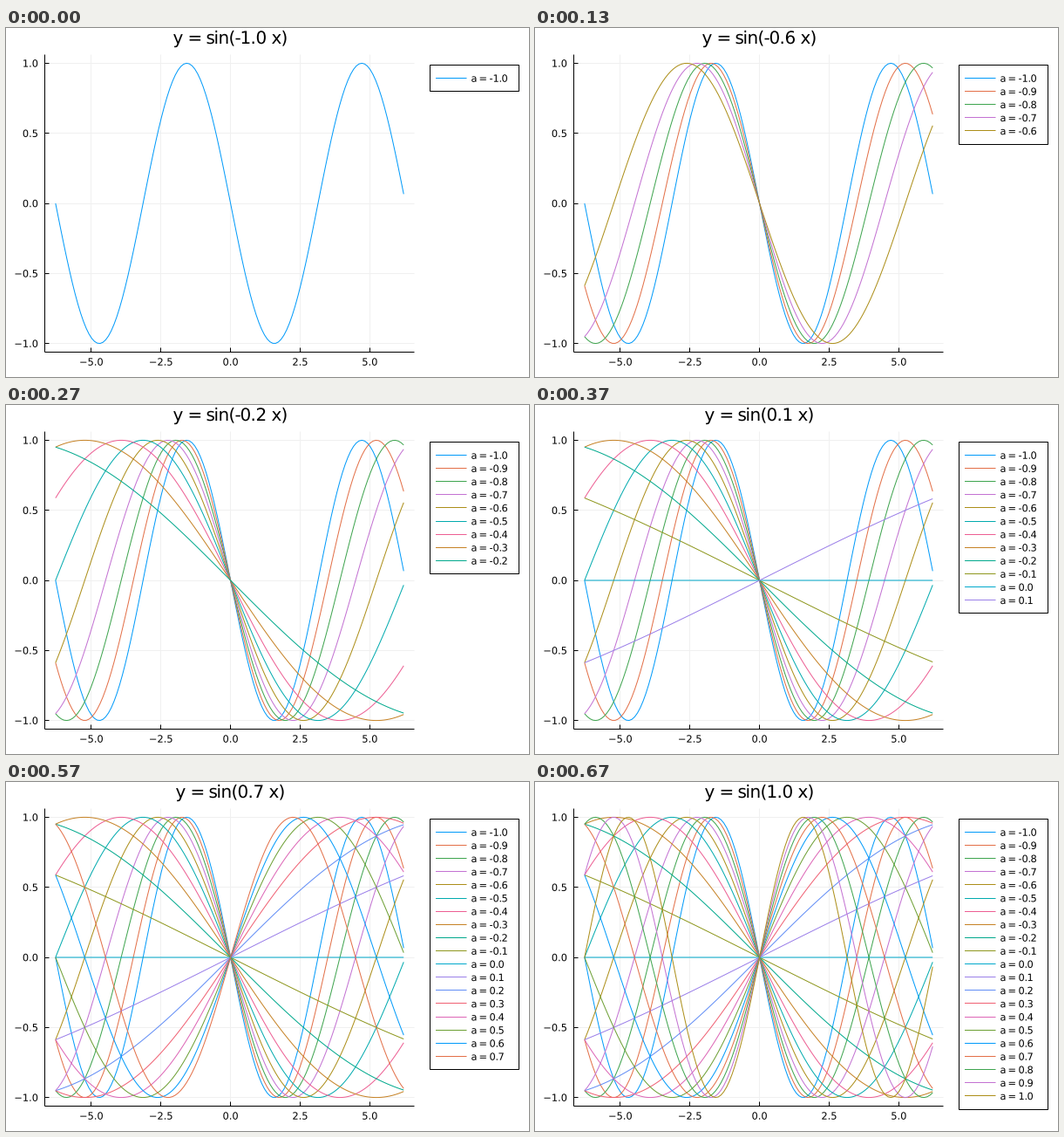
Write a matplotlib script that moves like this. It is 600 px wide and 400 px high and loops after 710 ms.

```python
import math
from functools import lru_cache

import matplotlib.pyplot as plt
import numpy as np
from matplotlib.animation import FuncAnimation
from matplotlib.patches import PathPatch, Rectangle
from matplotlib.path import Path
from matplotlib.textpath import TextPath
from matplotlib.transforms import Affine2D

plt.rcParams["font.family"] = "DejaVu Sans"
plt.rcParams["path.simplify"] = False

W, H, DPI = 600, 400, 100
PX = 72 / DPI                     # one pixel in points
LEFT, RIGHT, TOP, BOTTOM = 44.5, 468.5, 30.5, 371.5
SMALL, LARGE = 11.4, 20           # font sizes in pixels
CURVES = 21
LEGEND_TOP, ROW = 42.5, 15.12

COLORS = (
    "#009afa #e36f47 #3ea44e #c371d2 #ac8e18 #00aaae #ed5e93 #c68225 "
    "#00a98d #8e971e #00a9cc #9b7fe9 #618df6 #f06073 #dd65b6 #6c9f33"
).split()


def px(x):
    return 257.6 + 31.95 * x


def py(y):
    return 201 - 160.6 * y


def crisp(v):
    """Centre of the pixel that holds v."""
    return math.floor(v) + 0.5


fig = plt.figure(figsize=(W / DPI, H / DPI), dpi=DPI, facecolor="white")
ax = fig.add_axes([0, 0, 1, 1])
ax.set_xlim(0, W)
ax.set_ylim(H, 0)
ax.axis("off")


def line(xs, ys, color="black", z=2.0):
    return ax.plot(xs, ys, color=color, lw=PX, zorder=z, snap=False,
                   solid_capstyle="butt")[0]


def hline(y, x0, x1, color="black", z=2.0):
    return line([x0, x1], [crisp(y)] * 2, color, z)


def vline(x, y0, y1, color="black", z=2.0):
    return line([crisp(x)] * 2, [y0, y1], color, z)


@lru_cache(None)
def advance(char, size):
    """Pen advance of one glyph, measured between two bars."""
    def end(s):
        return TextPath((0, 0), s, size=size).vertices[:, 0].max()
    return end(f"|{char}|") - end("||")


def label(x, y, text, size=SMALL, align=0.0, pitch=None):
    """Text on baseline y; pitch is the size that sets whole-pixel steps."""
    pen, glyphs = 0, []
    for char in text:
        if char != " ":
            glyphs.append(TextPath((pen, 0), char, size=size))
        pen += math.floor(advance(char, pitch)) if pitch else advance(char, size)
    place = Affine2D().scale(1, -1).translate(x - align * pen, y)
    patch = PathPatch(Path.make_compound_path(*glyphs), fc="black", lw=0,
                      transform=place + ax.transData, zorder=6)
    return ax.add_patch(patch)


def number(v):
    return f"{v:.1f}".replace("-", "\u2212")


def draw_axes():
    for v in (-5, -2.5, 0, 2.5, 5):
        x = px(v)
        vline(x, TOP, BOTTOM, "#f0f0f0", 1)
        vline(x, BOTTOM - 5, BOTTOM)
        label(x, 386.7, number(v), align=0.5)
    for v in (-1, -0.5, 0, 0.5, 1):
        y = py(v)
        hline(y, LEFT, RIGHT, "#f0f0f0", 1)
        hline(y, LEFT, LEFT + 5)
        label(37, y + 4.2, number(v), align=1)
    vline(LEFT, TOP, BOTTOM)
    hline(BOTTOM, LEFT, RIGHT)


draw_axes()
legend = ax.add_patch(Rectangle((486.5, LEGEND_TOP), 102, 0, fc="white",
                                ec="black", lw=PX, zorder=4, snap=False))

xs = -2 * np.pi + 0.1 * np.arange(126)
titles, groups = [], []
for i in range(CURVES):
    a = (i - 10) / 10
    color = COLORS[i % len(COLORS)]
    y = LEGEND_TOP + ROW * (i + 1) - 0.2
    titles.append(label(257, 18, f"y = sin({a:.1f} x)", LARGE, 0.5, 19))
    groups.append((
        line(px(xs), py(np.sin(a * xs)), color, 3 + i / 100),
        hline(y, 493, 528.5, color, 5),
        label(533.5, y + 4.3, f"a = {a:.1f}", pitch=SMALL),
    ))


def update(tick):
    # 30 curves per second, on a clock of 10 ms
    last = min(CURVES - 1, int((tick + 0.5) * 0.3))
    for i, (title, group) in enumerate(zip(titles, groups)):
        title.set_visible(i == last)
        for part in group:
            part.set_visible(i <= last)
    bottom = crisp(LEGEND_TOP + ROW * (last + 2) - 0.1)
    legend.set_height(bottom - LEGEND_TOP)
    return []


anim = FuncAnimation(fig, update, frames=71, interval=10, repeat=True,
                     repeat_delay=0, init_func=lambda: update(0))
plt.show()
```
